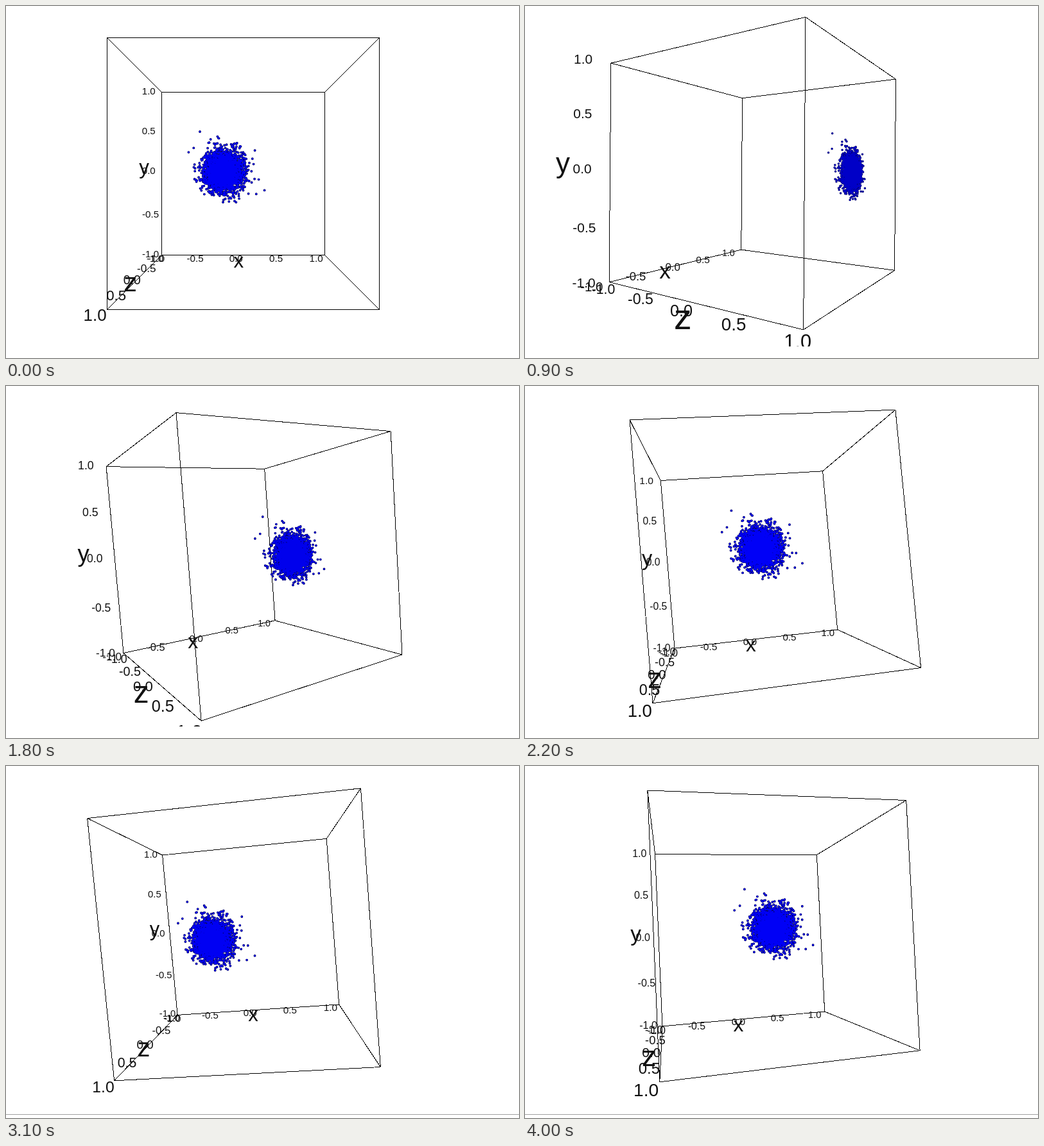
An HTML page that plays this animation: 799 px wide and 549 px high, repeating every 5.1 s.

```html
<!DOCTYPE html>
<html lang="en">
<head>
<meta charset="utf-8">
<title>Rotating scatter cube</title>
<style>
html, body { margin: 0; width: 100%; height: 100%; overflow: hidden; background: #fff; }
svg { display: block; width: 799px; height: 549px; }
text { font-family: "Liberation Sans", Arial, sans-serif; text-anchor: middle; fill: #111; }
</style>
</head>
<body>
<svg id="stage" viewBox="0 0 799 549">
  <defs><clipPath id="view"><rect width="799" height="531"/></clipPath></defs>
  <g clip-path="url(#view)">
    <path id="box" fill="none" stroke="#000" stroke-width="1" shape-rendering="crispEdges"/>
    <g id="labels"></g>
    <g fill="none" stroke-linecap="round">
      <path id="rims" stroke="#00005c"/>
      <path id="dots"/>
    </g>
  </g>
  <rect id="rule" y="543" width="799" height="1" fill="#a0a0a0"/>
</svg>
<script>
const LOOP = 5100, STEP = 100, RULE_AT = 3100;
const CX = 369.5, CY = 261.5, FOCAL = 636.8, DIST = 4;
const $ = id => document.getElementById(id);

// the cube turns only while it is dragged: start and end of each drag
const DRAGS = [[500, 1200], [1500, 2800], [3300, 3700], [3800, 4000]];

// dragged time, then yaw, pitch and roll in degrees
const POSES = [
  [0, 0, 0, 0], [200, 11, 0, 0], [400, 56, -0.2, -0.4], [500, 65, -0.3, -0.2],
  [700, 27, -5, 4.4], [800, 62, -2, 3.8], [1000, 30.4, 3.4, 4.2],
  [1400, 8, -1.5, 5.1], [1800, -4.6, 2.6, 4.9], [2000, -5, 2.7, 4.9],
  [2200, 17, 6, 2.9], [2400, 16, -0.6, 2.8], [2600, 13.3, -1.2, 2.7]
];

function poseAt(t) {
  const m = DRAGS.reduce((sum, [a, b]) => sum + Math.min(Math.max(t - a, 0), b - a), 0);
  const i = Math.max(1, POSES.findIndex(p => p[0] >= m));
  const p = POSES[i - 1], q = POSES[i];
  const u = (m - p[0]) / (q[0] - p[0]);
  return [1, 2, 3].map(n => (p[n] + (q[n] - p[n]) * u) * Math.PI / 180);
}

function makeCamera([yaw, pitch, roll]) {
  const { sin, cos } = Math;
  const sa = sin(yaw), ca = cos(yaw), sb = sin(pitch), cb = cos(pitch), sc = sin(roll), cc = cos(roll);
  return ([x, y, z]) => {
    const x1 = x * ca + z * sa, z1 = z * ca - x * sa;
    const y2 = y * cb - z1 * sb, z2 = y * sb + z1 * cb;
    const s = FOCAL / (DIST - z2);
    return { x: CX + (x1 * cc - y2 * sc) * s, y: CY - (x1 * sc + y2 * cc) * s, s, z: z2 };
  };
}

// cube edges
const EDGES = [];
for (const i of [-1, 1]) for (const j of [-1, 1])
  EDGES.push([[-1, i, j], [1, i, j]], [[i, -1, j], [i, 1, j]], [[i, j, -1], [i, j, 1]]);

// labels: anchor in space, then shift on screen and font size in scene units
const labels = [];
function addLabel(str, at, dx, dy, size) {
  const el = document.createElementNS("http://www.w3.org/2000/svg", "text");
  el.textContent = str;
  $("labels").append(el);
  labels.push({ el, at, dx, dy, size });
}
function addTicks(place, plus, minus) {
  for (let v = -1; v <= 1; v += 0.5)
    addLabel(v.toFixed(1), place(v), ...(v < 0 ? minus : plus), 0.122);
}
addTicks(v => [v, -1, -1.1], [-0.09, -0.098], [-0.1, -0.102]);
addTicks(v => [-1.1, v, -1.13], [-0.086, -0.007], [-0.063, -0.048]);
addTicks(v => [-1.1, -1, v], [0.012, -0.083], [0.035, -0.083]);
addLabel("x", [0, -1, -1.27], -0.06, -0.212, 0.26);
addLabel("y", [-1.15, 0, -1.28], -0.13, -0.002, 0.26);
addLabel("z", [-1.2, -1, 0], 0.095, -0.153, 0.26);

// cloud on the unit sphere, gathered around one direction
let seed = 41;
const random = () => (seed = (seed * 16807) % 2147483647) / 2147483647;

function onSphere(x, y) {
  return [x, y, Math.sqrt(1 - x * x - y * y)];
}

const MEAN = onSphere(-0.147, 0.014);
const TILT = Math.hypot(MEAN[0], MEAN[2]);

function around(r, a) {
  const u = Math.cos(a) * Math.sin(r), v = Math.sin(a) * Math.sin(r), w = Math.cos(r);
  const [x, y, z] = MEAN;
  return [
    x * w + (u * z - v * x * y) / TILT,
    y * w + v * TILT,
    z * w - (u * x + v * z * y) / TILT
  ];
}

// lone dots, then a loose cluster at the upper left, then the core with a thin halo
const cloud = [[-0.33, 0.32], [-0.415, 0.163], [-0.375, 0.195], [0.157, -0.123], [0.114, -0.043], [0.096, -0.15], [0.086, 0.172]]
  .map(p => onSphere(...p));
for (let i = 0; i < 9; i++) cloud.push(onSphere(-0.26 + 0.08 * random(), 0.2 + 0.08 * random()));
while (cloud.length < 3500) {
  const spread = cloud.length % 40 ? 0.07 : 0.11;
  const r = spread * Math.sqrt(-2 * Math.log(random()));
  const a = random() * 2 * Math.PI;
  if (r < 0.25) cloud.push(around(r, a));
}

const point = p => p.x.toFixed(1) + " " + p.y.toFixed(1);

function draw(t) {
  const cam = makeCamera(poseAt(t));
  $("box").setAttribute("d", EDGES.map(e => "M" + e.map(v => point(cam(v))).join("L")).join(""));

  for (const { el, at, dx, dy, size } of labels) {
    const p = cam(at);
    el.setAttribute("x", (p.x + dx * p.s).toFixed(2));
    el.setAttribute("y", (p.y - dy * p.s).toFixed(2));
    el.setAttribute("font-size", (size * p.s).toFixed(2));
  }

  const d = cloud.map(v => "M" + point(cam(v)) + "h0").join("");
  const m = cam(MEAN);
  $("rims").setAttribute("d", d);
  $("rims").setAttribute("stroke-width", 0.0185 * m.s);
  $("dots").setAttribute("d", d);
  $("dots").setAttribute("stroke-width", 0.012 * m.s);
  $("dots").setAttribute("stroke", `rgb(0,0,${Math.round(100 + 147 * m.z)})`);
  $("rule").setAttribute("visibility", t >= RULE_AT ? "visible" : "hidden");
}

let shown = -1;
const start = performance.now();
function tick() {
  const now = Math.max(0, performance.now() - start) % LOOP;
  const t = Math.floor(now / STEP) * STEP;
  if (t !== shown) draw(shown = t);
  requestAnimationFrame(tick);
}
tick();
</script>
</body>
</html>
```
